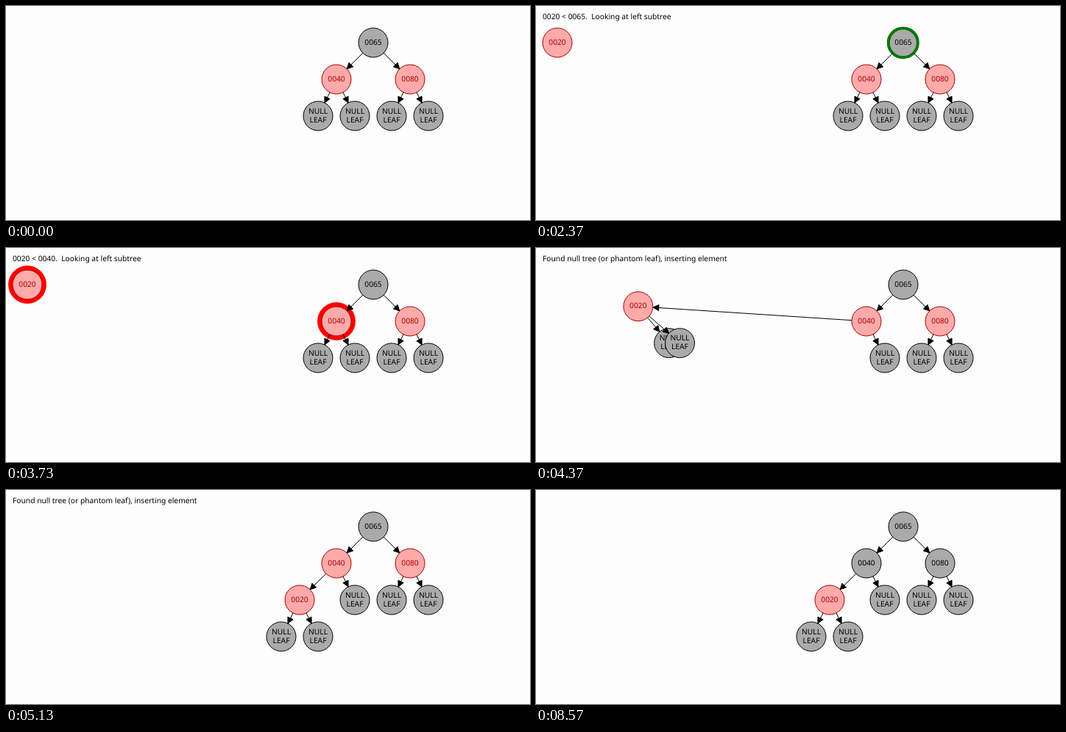
Animation of 712 by 292 pixels, one loop 9230 ms. Source, as an HTML page:

```html
<!DOCTYPE html>
<html lang="en">
<head>
<meta charset="utf-8">
<title>Red-black tree insertion</title>
<style>
  html, body { margin: 0; width: 100%; height: 100%; overflow: hidden; background: #fdfdfd; }
  svg { display: block; width: 712px; height: 292px; }
  text {
    font: 10.25px "Noto Sans", "Open Sans", sans-serif;
    text-rendering: geometricPrecision;
    white-space: pre;
  }
</style>
</head>
<body>
<svg id="stage" viewBox="0 0 712 292" xmlns="http://www.w3.org/2000/svg"></svg>
<script>
const stage = document.getElementById('stage');
const LOOP = 9230, MOVE = 832, R = 20;

// Start times of the steps
const CREATE = 670, LOOK_ROOT = 1500, DESCEND = 2368, LOOK_CHILD = 3245,
      INSERT = 4124, DOUBLE_RED = 5870, RECOLOR = 6730, ROOT_RED = 7600, DONE = 8500;

const RED = { fill: '#ffaaaa', ink: '#aa0000' };
const BLACK = { fill: '#aaaaaa', ink: '#000' };

const MESSAGES = [
  [0, ''],
  [CREATE, 'Inserting 0020'],
  [LOOK_ROOT, '0020 < 0065.  Looking at left subtree'],
  [LOOK_CHILD, '0020 < 0040.  Looking at left subtree'],
  [INSERT, 'Found null tree (or phantom leaf), inserting element'],
  [DOUBLE_RED, 'Node and parent are both red.  Uncle of node is red -- push blackness down from grandparent'],
  [ROOT_RED, 'Root of the tree is red.  Color it black.'],
  [DONE, '']
];

const between = (t, a, b) => t >= a && t < b;
const progress = (t, start) => Math.min(1, Math.max(0, (t - start) / MOVE));
const mix = (a, b, k) => a + (b - a) * k;
const at = (x, y) => ({ x, y });
const travel = (a, b, k) => at(mix(a.x, b.x, k), mix(a.y, b.y, k));
const escapeText = s => s.replace(/&/g, '&amp;').replace(/</g, '&lt;');

// Baselines sit on whole pixels
const label = (s, x, y, color, anchor) =>
  `<text x="${x}" y="${Math.floor(y)}" fill="${color}" text-anchor="${anchor}">${escapeText(s)}</text>`;

const disc = (p, r, attrs) => `<circle cx="${p.x}" cy="${p.y}" r="${r}" ${attrs}/>`;

function node(p, name, tone, ring) {
  const lines = name.split('\n');
  const top = p.y + 3 - (lines.length - 1) * 6;
  return (ring ? disc(p, R + ring, 'fill="#f00"') : '') +
    disc(p, R, `fill="${tone.fill}" stroke="${tone.ink}"`) +
    lines.map((s, i) => label(s, p.x, top + i * 12, tone.ink, 'middle')).join('');
}

const leaf = p => node(p, 'NULL\nLEAF', BLACK);

function edge(a, b) {
  const d = Math.hypot(b.x - a.x, b.y - a.y);
  const ux = (b.x - a.x) / d, uy = (b.y - a.y) / d;
  const tip = at(b.x - ux * R, b.y - uy * R);
  const base = at(tip.x - ux * 8, tip.y - uy * 8);
  return `<path d="M${a.x + ux * R} ${a.y + uy * R}L${tip.x} ${tip.y}` +
    `L${base.x - uy * 4} ${base.y + ux * 4}L${base.x + uy * 4} ${base.y - ux * 4}L${tip.x} ${tip.y}" stroke="#000"/>`;
}

// Highlight thickness: a triangle wave between 3 and 7 pixels
function pulse(t) {
  const phase = (t - 1766) / 217;
  const m = ((phase % 8) + 8) % 8;
  return 7 - Math.min(m, 8 - m);
}

const root = at(499, 50), left = at(449, 100), right = at(549, 100);
const oldLeaf = at(424, 150), leftLeaf = at(474, 150);
const rightLeaves = [at(524, 150), at(574, 150)];

function draw(t) {
  const inserted = t >= INSERT;
  const k = progress(t, INSERT);
  const fresh = travel(at(29, 50), at(399, 150), k);
  const freshLeaves = [374, 424].map(x => travel(at(99, 100), at(x, 200), k));

  const onRoot = between(t, LOOK_ROOT, DESCEND);
  const onChild = between(t, LOOK_CHILD, INSERT);
  const ring = pulse(t);
  const childTone = t >= RECOLOR ? BLACK : RED;
  const rootTone = between(t, RECOLOR, DONE) ? RED : BLACK;

  let out = label(MESSAGES.filter(m => t >= m[0]).pop()[1], 9, 18, '#000', 'start');

  out += node(root, '0065', rootTone, onRoot && ring);
  out += node(left, '0040', childTone, onChild && ring);
  out += node(right, '0080', childTone);
  if (!inserted) out += leaf(oldLeaf);
  out += leaf(leftLeaf) + rightLeaves.map(leaf).join('');
  if (t >= CREATE) out += node(fresh, '0020', RED, (onRoot || onChild) && ring);
  if (inserted) out += freshLeaves.map(leaf).join('');

  if (between(t, DESCEND, LOOK_CHILD)) {
    out += disc(travel(root, left, progress(t, DESCEND)), R, 'fill="none" stroke="#070" stroke-width="4"');
  }

  // Edges lie above all nodes
  out += edge(root, left) + edge(root, right) + edge(left, leftLeaf);
  out += rightLeaves.map(p => edge(right, p)).join('');
  out += inserted
    ? edge(left, fresh) + freshLeaves.map(p => edge(fresh, p)).join('')
    : edge(left, oldLeaf);

  stage.innerHTML = out;
}

const start = performance.now();
function tick() {
  draw((performance.now() - start) % LOOP);
  requestAnimationFrame(tick);
}
tick();
</script>
</body>
</html>
```
